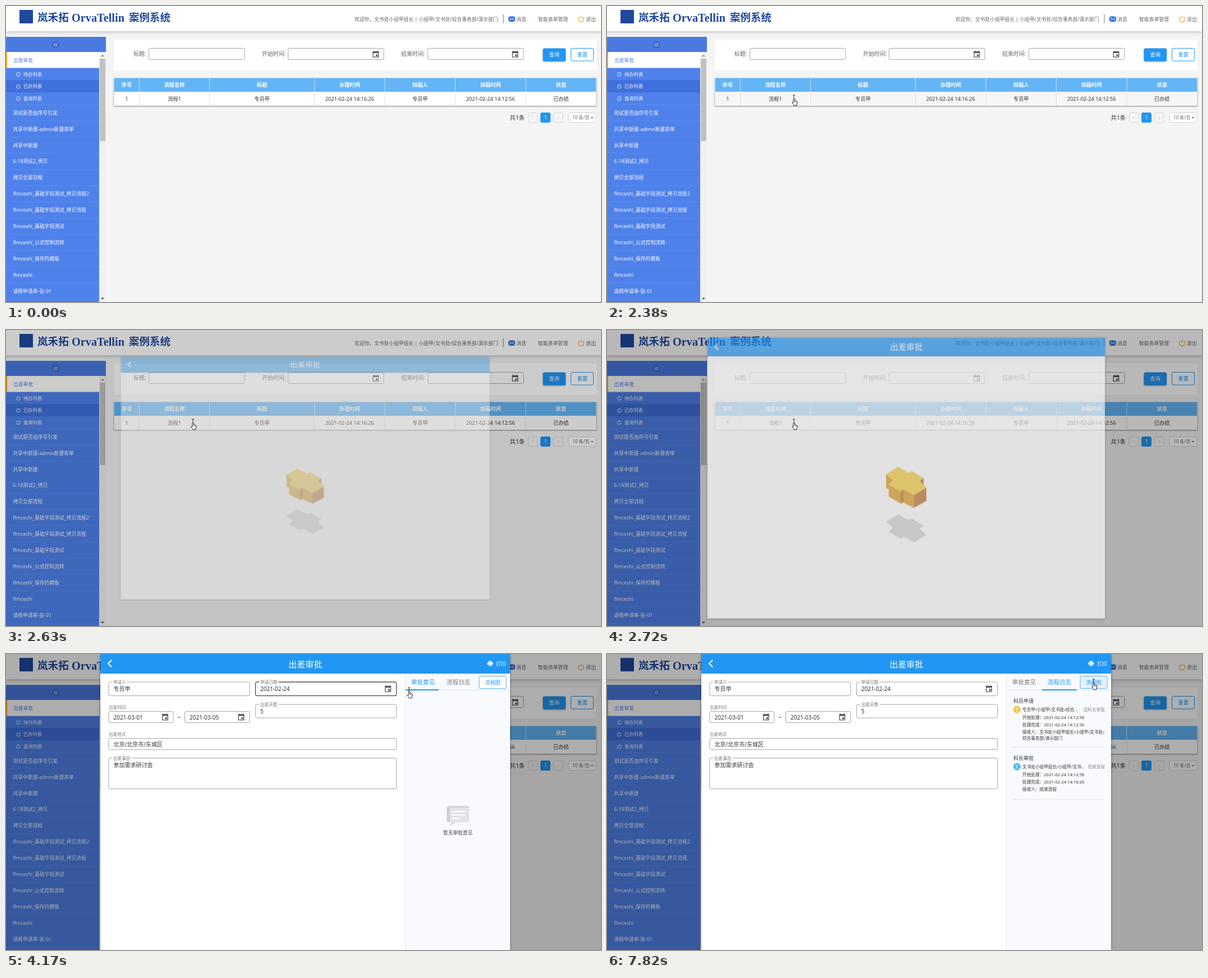
Animation of 1060x528 px, one loop 8 s. Source, as an HTML page:

```html
<!DOCTYPE html>
<html lang="zh-CN">
<head>
<meta charset="utf-8">
<title>出差审批</title>
<style>
html, body { margin: 0; height: 100%; overflow: hidden; background: #f4f4f4; }
svg { display: block; width: 100vw; height: 100vh; }
text { font-family: "Noto Sans", "Noto Sans CJK SC", sans-serif; white-space: pre; }
.serif { font-family: "Liberation Serif", serif; }

/* one loop is 8000 ms, so 1% is 80 ms */
#row, #shade, #dialog, #loader, #form, .hot, #panels, #ink, #tab1, #tab2, #chart, #cursor, #cursor g {
  animation: 8s step-end infinite;
}
#row { animation-name: row; }
@keyframes row { 0%, 31.625% { fill: #fff } 25.85% { fill: #f6f6f6 } }

#shade { animation-name: shade; }
@keyframes shade {
  0% { opacity: 0 } 31.625% { opacity: .07 } 32.875% { opacity: .2 }
  34% { opacity: .28 } 34.875%, 100% { opacity: .32 }
}
#dialog { animation-name: dialog; transform-origin: 533px 264.5px; }
@keyframes dialog {
  0% { opacity: 0; transform: scale(.775, .604) }
  31.625% { opacity: .05; transform: scale(.775, .604) }
  32.875% { opacity: .36; transform: scale(.9, .82) }
  34% { opacity: .64; transform: scale(.97, .949) }
  34.875%, 100% { opacity: 1; transform: none }
}
#loader { animation-name: loader; }
@keyframes loader { 0% { opacity: 1 } 39.5%, 100% { opacity: 0 } }
#form { animation-name: form; }
@keyframes form { 0% { opacity: 0 } 39.5% { opacity: .6 } 41.375%, 100% { opacity: 1 } }

.hot { fill: none; stroke: #222; opacity: 0; }
#hotPlace { animation-name: hotPlace; }
#hotDays { animation-name: hotDays; }
#hotDate { animation-name: hotDate; }
@keyframes hotPlace { 0%, 47% { opacity: 0 } 41.375% { opacity: 1 } }
@keyframes hotDays { 0%, 50% { opacity: 0 } 48.3% { opacity: 1 } }
@keyframes hotDate { 0%, 54.2% { opacity: 0 } 50.2% { opacity: 1 } }

#panels { animation-name: panels; }
@keyframes panels {
  0% { transform: none }
  63.875% { transform: none; animation-timing-function: cubic-bezier(.3, .3, .2, 1) }
  68%, 100% { transform: translateX(-187px) }
}
#ink { animation-name: ink; transform-origin: 712px 0; }
@keyframes ink {
  0% { transform: none }
  63.875% { transform: none; animation-timing-function: cubic-bezier(.3, .3, .2, 1) }
  68%, 100% { transform: translateX(63px) scaleX(1.05) }
}
#tab1 { animation-name: tab1; }
@keyframes tab1 { 0% { fill: #2196f3 } 63.875%, 100% { fill: #777 } }
#tab2 { animation-name: tab2; }
@keyframes tab2 {
  0% { fill: #777 } 56.125% { fill: #777; animation-timing-function: ease }
  60.75%, 100% { fill: #2196f3 }
}
#chart { animation-name: chart; }
@keyframes chart { 0% { fill: #fff } 96.5%, 100% { fill: #e6f1fb } }

#cursor { animation-name: move; }
@keyframes move {
  0% { transform: translate(1070px, 540px) }
  3.375% { transform: translate(1040px, 518px) }
  11.25% { transform: translate(1040px, 518px); animation-timing-function: steps(6, jump-both) }
  17% { transform: translate(416px, 192px) }
  19.125% { transform: translate(416px, 192px); animation-timing-function: steps(2, jump-both) }
  21.25% { transform: translate(366px, 186px) }
  21.875% { transform: translate(366px, 186px); animation-timing-function: steps(1, jump-both) }
  22.75% { transform: translate(336px, 181px) }
  24.875% { transform: translate(336px, 181px); animation-timing-function: steps(5, jump-both) }
  29.75% { transform: translate(333px, 165px) }
  46.375% { transform: translate(333px, 165px); animation-timing-function: steps(3, jump-both) }
  49.25% { transform: translate(600px, 76px) }
  50.2% { transform: translate(600px, 76px); animation-timing-function: steps(2, jump-both) }
  52.125% { transform: translate(718px, 66px) }
  53.125% { transform: translate(718px, 66px); animation-timing-function: steps(3, jump-both) }
  56.125% { transform: translate(806px, 53px) }
  57% { transform: translate(804px, 53px) }
  59% { transform: translate(802px, 52px) }
  60.75% { transform: translate(801px, 51px) }
  92% { transform: translate(801px, 51px); animation-timing-function: steps(6, jump-both) }
  97.75%, 100% { transform: translate(867px, 51px) }
}
#arrow { animation-name: arrow; }
#beam { animation-name: beam; }
#hand { animation-name: hand; }
@keyframes arrow {
  0%, 46.375%, 49.25%, 52.125% { opacity: 1 }
  41.375%, 48.3%, 50.2%, 56.125%, 100% { opacity: 0 }
}
@keyframes beam {
  0%, 46.375%, 49.25%, 52.125%, 100% { opacity: 0 }
  41.375%, 48.3%, 50.2% { opacity: 1 }
}
@keyframes hand { 0% { opacity: 0 } 56.125%, 100% { opacity: 1 } }
</style>
</head>
<body>
<svg id="stage" viewBox="0 0 1060 528"></svg>
<script>
const BLUE = '#2196f3';

// Text centred vertically on y
const text = (x, y, size, str, fill = '#333', attrs = '') =>
  `<text x="${x}" y="${y + size * .37}" font-size="${size}" fill="${fill}" ${attrs}>${str}</text>`;
const mid = (x, y, size, str, fill, attrs = '') =>
  text(x, y, size, str, fill, 'text-anchor="middle" ' + attrs);
const rect = (x, y, w, h, fill, attrs = '') =>
  `<rect x="${x}" y="${y}" width="${w}" height="${h}" fill="${fill}" ${attrs}/>`;
const box = (x, y, w, h, stroke = '#a5a5a5', fill = '#fff', r = 2.5) =>
  rect(x, y, w, h, fill, `stroke="${stroke}" rx="${r}"`);
const line = (d, stroke, width = 1, attrs = '') =>
  `<path d="${d}" fill="none" stroke="${stroke}" stroke-width="${width}" ${attrs}/>`;
const shape = (d, fill, attrs = '') => `<path d="${d}" fill="${fill}" ${attrs}/>`;
const calendar = (x, y) => `<g transform="translate(${x} ${y})">` +
  line('M-4.8-4.3H4.8V5.2H-4.8Z', '#555', 1.3) + rect(-5, -5, 10, 3, '#555') +
  rect(-3.8, -6.3, 1.4, 2, '#555') + rect(2.4, -6.3, 1.4, 2, '#555') + rect(.2, .4, 3.2, 3.2, '#555') + '</g>';

function header() {
  return rect(0, 0, 1060, 45, '#fff', 'style="filter:drop-shadow(0 1px 3px #0004)"') +
    rect(24, 7, 24, 24, '#20489f') +
    text(56, 20, 18.6, '岚禾拓', '#20489f', 'font-weight="700"') +
    text(117, 20, 20.3, 'OrvaTellin', '#20489f', 'font-weight="700" class="serif"') +
    text(219, 20, 18.5, '案例系统', '#20489f', 'font-weight="700"') +
    text(621, 23.5, 8.75, '欢迎你，文书处小组甲组长 | 小组甲/文书处/综合事务部/演示部门', '#666') +
    line('M886 15V31', '#777') +
    rect(895, 18.5, 12, 9.5, '#2d6fd0') +
    line('M895 18.5L901 24 907 18.5M895 28L899.5 23M907 28L902.5 23', '#fff', 1) +
    text(909, 23.5, 9, '消息', '#666') + text(948, 23.5, 8.83, '智能表单管理', '#666') +
    line('M1021.8 19.5A4.9 4.9 0 1 0 1027.2 19.5M1024.5 17.5V23', '#e5a82c', 1.2) +
    text(1033, 23.5, 9, '退出', '#666');
}

function sidebar() {
  const subs = ['待办列表', '已办列表', '查询列表'];
  const items = ['测试是否由序号引发', '共享中新建-admin新建表单', '共享中新建', '6-18测试2_拷贝', '拷贝全部流程',
    'flmceshi_基础字段测试_拷贝流程2', 'flmceshi_基础字段测试_拷贝流程', 'flmceshi_基础字段测试',
    'flmceshi_公式控制流转', 'flmceshi_保存的模板', 'flmceshi', '请假申请单-张-01'];
  return rect(0, 55, 178, 27, '#4a79e0') + '<circle cx="88.5" cy="69" r="6.5" fill="#3f69c6"/>' +
    line('M88 66L85.4 69 88 72M91.4 66L88.8 69 91.4 72', '#fff', .9) +
    rect(0, 82, 166, 446, '#4f81ea') + rect(0, 82, 166, 28.5, '#fff') + rect(0, 82, 2, 28.5, '#f5a31c') +
    text(13, 97, 8.8, '出差审批', '#4f81ea') + rect(0, 132, 166, 22, '#3f70dc') +
    subs.map((s, i) => `<circle cx="22" cy="${122 + i * 21.6}" r="3.2" fill="none" stroke="#fff" stroke-width=".9"/>` +
      text(31, 121.5 + i * 21.6, 8.3, s, '#fff')).join('') +
    items.map((s, i) => line(`M0 ${176 + i * 28.9}H166`, '#6390ee', .8) +
      text(12.5, 190.5 + i * 28.9, 8.8, s, '#fff')).join('') +
    line('M0 522.8H166', '#6390ee', .8) +
    rect(166, 82, 12, 446, '#f1f1f1') + rect(167, 94, 10, 147, '#c1c1c1') +
    shape('M169 90L172 87 175 90Z', '#888') + shape('M169 520.5L172 523.5 175 520.5Z', '#444');
}

function list() {
  const edges = [192.5, 237.5, 362.5, 549.5, 675, 800.5, 926, 1051.5];
  const heads = ['序号', '流程名称', '标题', '办理时间', '拟稿人', '拟稿时间', '状态'];
  const cells = ['1', '流程1', '专员甲', '2021-02-24 14:16:26', '专员甲', '2021-02-24 14:12:56', '已办结'];
  const centre = i => (edges[i] + edges[i + 1]) / 2;
  return rect(192, 60, 860, 55, '#fff') +
    text(227, 85.5, 9.9, '标题:', '#666') + text(456, 85.5, 9.9, '开始时间:', '#666') +
    text(704, 85.5, 9.9, '结束时间:', '#666') +
    [254.5, 502.5, 751.5].map(x => box(x, 75.5, 170.5, 20)).join('') + calendar(658.8, 86) + calendar(907, 86) +
    rect(956.5, 75.5, 40.5, 23, BLUE, 'rx="2.5" style="filter:drop-shadow(0 1px 1px #0006)"') +
    mid(976.8, 87, 9.2, '查询', '#fff') + box(1006.5, 75.5, 40, 22.5, BLUE) + mid(1026.7, 87, 9.2, '重置', BLUE) +
    rect(192, 128.5, 860, 49.5, '#fff', 'style="filter:drop-shadow(0 1px 1px #0007)"') +
    rect(192, 128.5, 860, 24.5, '#64b5f6') + rect(192, 153, 860, 25, '#fff', 'id="row"') +
    edges.map(x => line(`M${x} 128.5V153`, '#c4e2fb') + line(`M${x} 153V178`, '#e2e2e2')).join('') +
    heads.map((s, i) => mid(centre(i), 141, 9.2, s, '#fff', 'font-weight="700"')).join('') +
    cells.map((s, i) => mid(centre(i), 166, 9.2, s)).join('') +
    text(897.5, 199, 10.4, '共1条') +
    box(930.5, 190.5, 16.5, 17, '#d5d5d5', '#f6f6f6', 3) + box(975.5, 190.5, 16.5, 17, '#d5d5d5', '#f6f6f6', 3) +
    line('M940 196.5L937.5 199 940 201.5M982.5 196.5L985 199 982.5 201.5', '#bbb', .9) +
    rect(952, 190, 18, 18, BLUE, 'rx="3"') + mid(961, 199, 8, '1', '#fff') +
    box(1002, 190.5, 49, 17, '#d5d5d5', '#fff', 3) + text(1009, 199, 8.1, '10 条/页', '#666') +
    shape('M1041.5 198H1046.5L1044 201Z', '#777');
}

function loader() {
  const top = 'M496 257L518 243 537 254 543 251 565 264 558 270 570 282 547 296 528 285 523 289 501 276 509 268Z';
  return shape(top, '#d5d5d5', 'transform="translate(0 89)"') +
    shape('M496 257L509 268 501 276 523 289 528 285 547 296V320L526 309 523 312 501 299V286L496 282Z', '#e09e29') +
    shape('M570 282V307L547 320V296ZM523 289L528 285V309L523 312ZM565 264V278L558 270Z', '#c27734') +
    shape(top, '#f6d049');
}

function form() {
  const value = (x, y, s) => text(x, y, 10, s);
  const label = (x, y, s) => text(x, y, 7.6, s, '#777');
  const notch = (x, y, s) => rect(x - 2, y - 2, s.length * 7.6 + 4, 4, '#fff') + label(x, y, s);
  const hot = (id, x, y, w, h) => `<rect id="${id}" class="hot" x="${x}" y="${y}" width="${w}" height="${h}" rx="2.5"/>`;
  return box(183, 50, 251, 24.5) + notch(191, 50.5, '申请人') + value(191.5, 62.5, '专员甲') +
    box(444.5, 50, 251, 24.5) + hot('hotDate', 444.5, 50, 251, 24.5) + notch(453, 50.5, '申请日期') +
    value(453, 62.5, '2021-02-24') + calendar(680.5, 62) +
    label(183, 95.5, '出差时间') + box(183, 102.5, 115, 20) + box(318.5, 102.5, 115.5, 20) +
    value(191.5, 113, '2021-03-01') + value(327, 113, '2021-03-05') + calendar(283.5, 112.5) + calendar(419, 112.5) +
    mid(308.3, 113, 10, '~') +
    box(444.5, 90, 251, 24) + hot('hotDays', 444.5, 90, 251, 24) + notch(453, 90.5, '出差天数') + value(453, 102.5, '5') +
    label(183, 143.5, '出差地点') + box(183, 150.5, 512.5, 20) + hot('hotPlace', 183, 150.5, 512.5, 20) +
    value(191.5, 161, '北京/北京市/东城区') +
    box(183, 185.5, 512.5, 55) + notch(191, 186.5, '出差事由') + value(191.5, 198.5, '参加需求研讨会');
}

function logEntry(y, step, colour, who, action, lines) {
  return text(724, y, 9, step) + `<circle cx="730.3" cy="${y + 15}" r="6.5" fill="${colour}"/>` +
    mid(730.3, y + 15, 7.6, who[0], '#fff') + text(740, y + 15, 7.65, who) +
    text(887, y + 15, 7.6, action, '#888', 'text-anchor="end"') +
    lines.map((s, i) => text(740, y + 29 + (i < 3 ? i * 13.2 : 37), 7.65, s)).join('');
}

function side() {
  const empty = shape('M789 271H822Q825 271 825 274V297Q825 300 822 300H800L793 306V300H789Q785 300 785 297V274Q785 271 789 271Z', '#d0d2d6') +
    shape('M791 274H825V297Q825 300 822 300H800L796 303V300H791Z', '#e3e4e8') +
    line('M794 281H818M794 287H818M794 293H808', '#fff', 2) + mid(805, 318.5, 8.75, '暂无审批意见', '#444');
  const log = logEntry(84, '科员申请', '#f8c03c', '专员甲/小组甲/文书处/综合...', '送科长审批',
      ['开始处理：2021-02-24 14:12:56', '处理完成：2021-02-24 14:12:56', '接收人：文书处小组甲组长/小组甲/文书处/', '综合事务部/演示部门']) +
    logEntry(186, '科长审批', '#47b8ea', '文书处小组甲组长/小组甲/文书...', '结束流程',
      ['开始处理：2021-02-24 14:12:56', '处理完成：2021-02-24 14:16:26', '接收人：结束流程']) +
    line('M724 166.5H886M724 259H886', '#dde1e8');
  return rect(711, 35, 187, 493, '#f9fafe') + line('M711.5 35V528M711 64.5H898', '#dfe3ea') +
    mid(743, 50, 10.6, '审批意见', BLUE, 'id="tab1"') + mid(806, 50, 10.6, '流程日志', '#777', 'id="tab2"') +
    rect(712, 63, 59, 2, BLUE, 'id="ink"') +
    rect(843, 39.5, 48, 22, '#fff', 'id="chart" stroke="#58aef5" rx="2"') + mid(867, 51, 9.2, '流程图', BLUE) +
    `<g clip-path="url(#sideClip)"><g id="panels">${empty}<g transform="translate(187)">${log}</g></g></g>`;
}

function dialog() {
  const print = rect(859.5, 12.5, 6, 2, '#fff') + rect(857.5, 15, 10, 4.5, '#fff', 'rx="1"') +
    rect(859.5, 18, 6, 3.5, '#fff', `stroke="${BLUE}" stroke-width=".7"`) + text(873, 17.5, 9, '打印', '#fff');
  return rect(168, 0, 730, 528, '#fff', 'style="filter:drop-shadow(0 1px 2px #0006)"') +
    rect(168, 0, 730, 35, BLUE) + line('M188 11L182 17 188 23', '#fff', 2) +
    mid(533.2, 18, 15, '出差审批', '#fff', 'font-weight="500"') +
    `<g id="loader">${loader()}</g><g id="form">${print}${form()}${side()}</g>`;
}

const cursor = '<g id="arrow">' +
    shape('M.4.4V9.8L2.5 7.9 4 11 5.3 10.4 4 7.3H6.7Z', '#fff', 'stroke="#222" stroke-width=".8"') + '</g>' +
  '<g id="beam">' + line('M-2-6H2M0-6V6M-2 6H2', '#222', .9) + '</g><g id="hand">' +
    shape('M-1 1Q0-.6 1 1V5L5 5.6Q6 6 6 7.2L5 10.3V12.6H-.2V11.4L-3 8Q-3.2 6.4-1 7.6Z', '#fff',
      'stroke="#222" stroke-width=".9" stroke-linejoin="round"') + '</g>';

document.getElementById('stage').innerHTML =
  '<defs><clipPath id="sideClip"><rect x="712" y="65" width="186" height="463"/></clipPath></defs>' +
  rect(0, 0, 1060, 528, '#f4f4f4') + header() + sidebar() + list() +
  rect(0, 0, 1060, 528, '#000', 'id="shade"') +
  `<g id="dialog">${dialog()}</g><g id="cursor">${cursor}</g>`;
</script>
</body>
</html>
```
